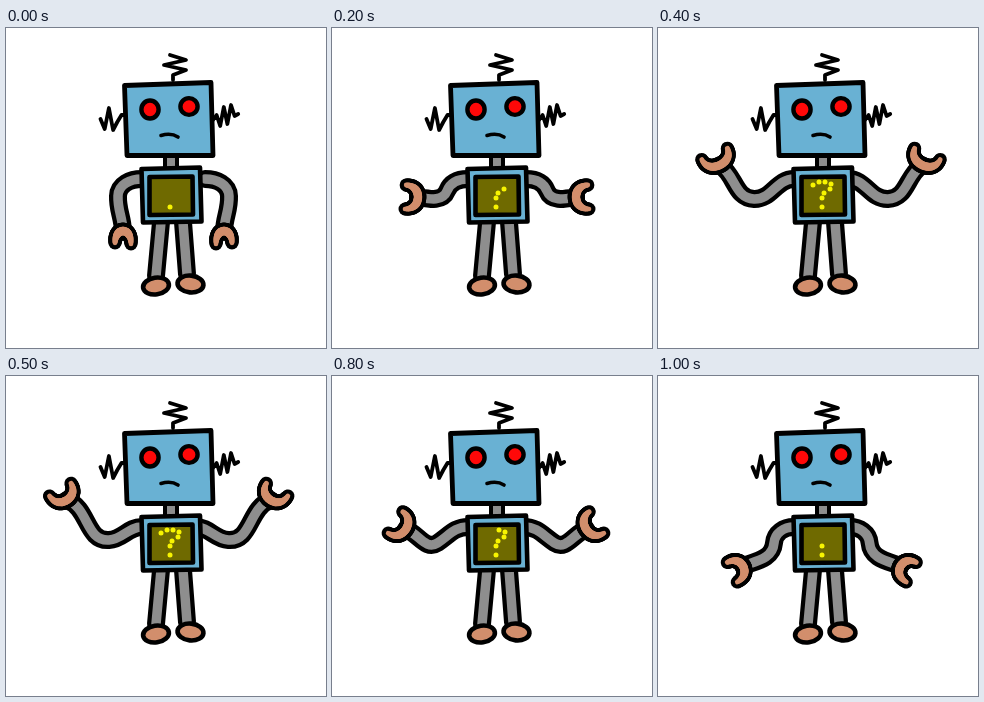
Write an HTML page with a canvas that moves like this. It is 320x320 px and loops after 1.1 s.

```html
<!DOCTYPE html>
<html lang="en">
<head>
<meta charset="utf-8">
<title>Shrugging robot</title>
<style>
  html, body { margin: 0; width: 100%; height: 100%; overflow: hidden; background: #fff; }
  canvas { display: block; width: 320px; height: 320px; }
</style>
</head>
<body>
<canvas id="stage"></canvas>
<script>
(() => {
  const canvas = document.getElementById('stage');
  const ctx = canvas.getContext('2d');
  const ratio = window.devicePixelRatio || 1;
  canvas.width = canvas.height = 320 * ratio;

  const INK = '#000', BLUE = '#69b1d3', GREY = '#8e8e8e', SKIN = '#d28e6c';
  const RED = '#ff0808', OLIVE = '#6f6a00', YELLOW = '#f8f400';
  const STEP = 100;
  const ORDER = [0, 1, 2, 3, 4, 5, 5, 4, 3, 2, 1];
  const SHOULDER = { x: 136, y: 151, angle: 180 };

  // Left arm; the right one is mirrored about x = axis. Angles in degrees.
  // reach: the arm's heading at the wrist, turn: where the claw opens, span: tip distance.
  const pose = (axis, dots, ex, ey, bend, wx, wy, reach, turn, span) =>
    ({ axis, dots, ex, ey, bend, wx, wy, reach, turn, span });

  const mix = (a, b) => {
    const out = {};
    for (const key in a) out[key] = (a[key] + b[key]) / 2;
    return out;
  };

  const down = pose(167.5, 1, 112, 168, 92, 117, 203, 88, 90, 16);
  const low = pose(163.8, 2, 116, 167, 95, 85, 190, 160, 150, 22);
  const side = pose(165, 4, 115, 163, 112, 86, 169, 190, 180, 24);
  const high = pose(163, 8, 96, 171, 182, 62, 137, 215, 244, 28);
  const peak = pose(162.7, 8, 103, 164, 176, 61, 124, 200, 237, 25);
  const POSES = [down, low, side, mix(side, high), high, peak];

  const QUESTION = [[164, 179], [164, 170], [166, 165], [172, 161],
    [173, 156], [167, 154], [161, 154], [155, 157]];

  function stroke(color, width) {
    ctx.strokeStyle = color;
    ctx.lineWidth = width;
    ctx.stroke();
  }

  function box(points, fill, width) {
    ctx.beginPath();
    points.forEach(([x, y]) => ctx.lineTo(x, y));
    ctx.closePath();
    ctx.fillStyle = fill;
    ctx.fill();
    stroke(INK, width);
  }

  function oval(x, y, rx, ry, fill, tilt = 0, width = 0) {
    ctx.beginPath();
    ctx.ellipse(x, y, rx, ry, tilt, 0, Math.PI * 2);
    ctx.fillStyle = fill;
    ctx.fill();
    if (width) stroke(INK, width);
  }

  // Evenly stepped spikes, sideways or upright.
  function spikes(values, from, step, upright = false) {
    ctx.beginPath();
    values.forEach((v, i) => {
      const pos = from + i * step;
      upright ? ctx.lineTo(v, pos) : ctx.lineTo(pos, v);
    });
    stroke(INK, 3.8);
  }

  function tube() {
    stroke(INK, 18);
    stroke(GREY, 9.5);
  }

  function leg(x1, y1, x2, y2) {
    ctx.beginPath();
    ctx.moveTo(x1, y1);
    ctx.lineTo(x2, y2);
    tube();
  }

  function bendTo(a, b) {
    const pull = 0.4 * Math.hypot(b.x - a.x, b.y - a.y);
    const s = a.angle * Math.PI / 180, e = b.angle * Math.PI / 180;
    ctx.bezierCurveTo(
      a.x + pull * Math.cos(s), a.y + pull * Math.sin(s),
      b.x - pull * Math.cos(e), b.y - pull * Math.sin(e), b.x, b.y);
  }

  function arm(p) {
    const elbow = { x: p.ex, y: p.ey, angle: p.bend };
    const wrist = { x: p.wx, y: p.wy, angle: p.reach };
    ctx.beginPath();
    ctx.moveTo(SHOULDER.x, SHOULDER.y);
    bendTo(SHOULDER, elbow);
    bendTo(elbow, wrist);
    tube();
  }

  // A crescent, thick in the middle and tapering to both tips.
  function claw(p) {
    ctx.save();
    ctx.translate(p.wx, p.wy);
    ctx.rotate(p.turn * Math.PI / 180);
    for (const [fill, edge] of [[INK, 4.2], [SKIN, 0]]) {
      for (let t = -1; t <= 1; t += 0.05) {
        const r = 2.3 + 1.9 * Math.cos(t * Math.PI / 2) + edge;
        oval(13 * t * t, p.span / 2 * Math.sin(t * Math.PI / 2), r, r, fill);
      }
    }
    ctx.restore();
  }

  function drawArms(p) {
    for (const mirrored of [false, true]) {
      ctx.save();
      if (mirrored) {
        ctx.translate(2 * p.axis, 0);
        ctx.scale(-1, 1);
      }
      arm(p);
      claw(p);
      ctx.restore();
    }
  }

  function drawHead() {
    spikes([164, 180, 158, 180, 167, 167], 27, 5, true);
    spikes([91, 101, 80, 102, 94, 87, 87], 94.5, 4.2);
    spikes([92, 87, 98, 79, 96, 77, 88, 86], 207, 3.6);
    box([[159, 126], [171, 126], [171, 141], [159, 141]], GREY, 4);
    box([[118.5, 57.5], [205, 54.5], [207, 127.5], [121, 127.5]], BLUE, 4.8);
    oval(144, 81.5, 8.6, 9, RED, 0, 4.4);
    oval(183, 78.5, 8.6, 8.4, RED, 0, 4.4);
    ctx.beginPath();
    ctx.moveTo(155, 107.5);
    ctx.quadraticCurveTo(165, 104.5, 172, 109);
    stroke(INK, 3.6);
  }

  function drawLegs() {
    leg(155, 194, 150, 248);
    leg(177, 194, 181, 246);
    oval(150, 258, 13, 8.4, SKIN, -0.15, 4.6);
    oval(184.5, 256, 13, 8.4, SKIN, 0.1, 4.6);
  }

  function drawBody(dots) {
    box([[135.5, 141], [194, 139.5], [195.5, 193.5], [137, 194.5]], BLUE, 4.6);
    box([[143.5, 149], [186.5, 148.5], [187, 186.5], [143.5, 187]], OLIVE, 4.6);
    QUESTION.slice(0, dots).forEach(([x, y]) => oval(x, y, 2.5, 2.5, YELLOW));
  }

  function draw(time) {
    const current = POSES[ORDER[Math.floor(time / STEP) % ORDER.length]];
    ctx.setTransform(ratio, 0, 0, ratio, 0, 0);
    ctx.fillStyle = '#fff';
    ctx.fillRect(0, 0, 320, 320);
    ctx.lineCap = ctx.lineJoin = 'round';
    drawHead();
    drawLegs();
    drawArms(current);
    drawBody(current.dots);
  }

  const start = performance.now();
  function tick() {
    draw(performance.now() - start);
    requestAnimationFrame(tick);
  }
  tick();
})();
</script>
</body>
</html>
```
